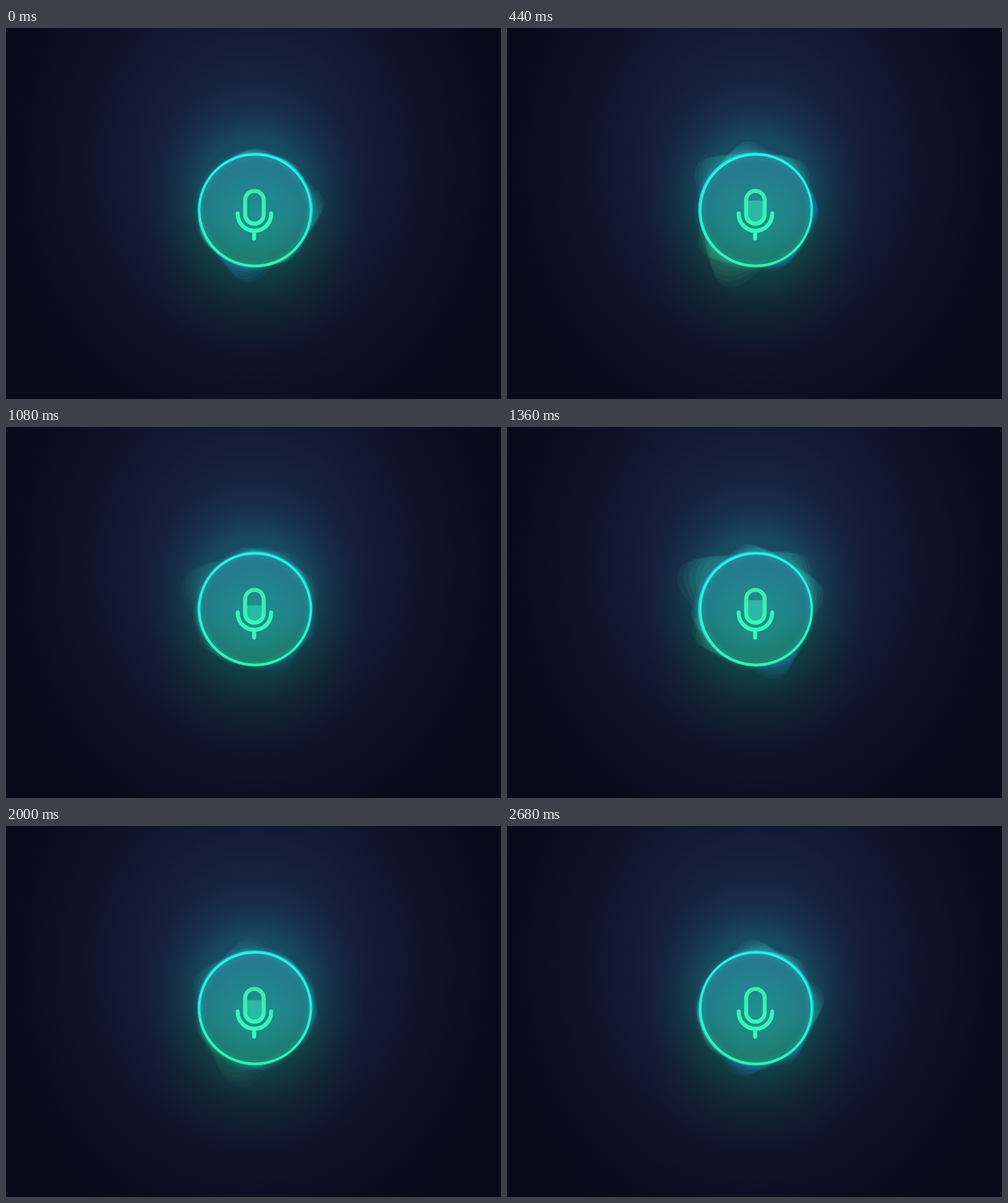
Write an HTML page with a canvas that moves like this. It is 800x600 px and loops after 2.72 s.

```html
<!DOCTYPE html>
<html lang="en">
<head>
<meta charset="utf-8">
<title>Voice button</title>
<style>
html, body { margin: 0; width: 100%; height: 100%; overflow: hidden; background: #070a19; }
canvas { display: block; width: 800px; height: 600px; }
</style>
</head>
<body>
<canvas id="stage" width="800" height="600"></canvas>
<script>
const LOOP = 2720, STEP = 40, TAU = Math.PI * 2;
const CX = 402.5, CY = 294.5, R = 90;
const BOX = { x: 200, y: 150, w: 400, h: 330 };
const ctx = document.getElementById('stage').getContext('2d');

// Wisp tints: teal, blue, green
const TINTS = ['40,200,165', '15,125,230', '45,180,100'];

// Each pose: time, then wisps as [angle, height, tint]
const POSES = [
  [0, [[-3, 21, 0], [101, 27, 1], [-92, 9, 2], [-52, 6, 0], [150, 6, 2], [55, 7, 2]]],
  [440, [[-137, 29, 0], [-102, 21, 0], [-48, 17, 0], [0, 11, 1], [117, 42, 2], [138, 20, 2], [62, 12, 1]]],
  [800, [[-88, 16, 0], [-45, 9, 0], [17, 20, 1], [171, 7, 0], [125, 10, 2]]],
  [1360, [[-149, 49, 0], [-95, 15, 0], [-50, 25, 0], [-20, 22, 0], [150, 20, 2], [172, 14, 0], [68, 26, 1]]],
  [1720, [[-105, 8, 2], [-50, 9, 0], [-5, 16, 2], [94, 18, 1], [148, 14, 2], [28, 6, 1]]],
  [2280, [[-92, 33, 0], [-143, 24, 0], [-55, 14, 0], [-15, 15, 0], [18, 22, 1], [113, 54, 2], [145, 16, 2], [85, 17, 1]]],
  [2680, [[-89, 20, 0], [-50, 14, 0], [-5, 20, 0], [100, 21, 1], [52, 14, 1], [172, 6, 0], [145, 9, 2]]]
];

// Microphone fill: time, top edge
const LEVELS = [[0, 314], [440, 279], [800, 297], [1360, 280], [1720, 295], [2040, 281], [2280, 290], [2640, 314], [2720, 314]];

const ease = x => (1 - Math.cos(Math.PI * x)) / 2;

function layer(w, h) {
  const canvas = document.createElement('canvas');
  canvas.width = w;
  canvas.height = h;
  return canvas.getContext('2d');
}

function gradient(g, stops) {
  stops.forEach(([at, color]) => g.addColorStop(at, color));
  return g;
}
const radial = (x, y, r, stops) => gradient(ctx.createRadialGradient(x, y, 0, x, y, r), stops);
const vertical = (y0, y1, stops) => gradient(ctx.createLinearGradient(0, y0, 0, y1), stops);

function circle(c, x, y, r) {
  c.beginPath();
  c.arc(x, y, r, 0, TAU);
}

const micPaint = vertical(260, 344, [[0, '#3cecaa'], [1, '#30ffc2']]);

function makeBackground() {
  const c = layer(800, 600);
  c.save();
  c.translate(400, 220);
  c.scale(420, 480);
  c.fillStyle = radial(0, 0, 1, [[0, '#1a3050'], [.25, '#182643'], [.46, '#131b37'], [.7, '#0e1228'], [1, '#070a19']]);
  c.fillRect(-1, -1, 2, 2);
  c.restore();
  const blueGlow = radial(402, 265, 180, [
    [0, 'rgba(25,110,140,.7)'], [.5, 'rgba(25,105,138,.48)'], [.72, 'rgba(22,80,115,.2)'], [1, 'rgba(20,60,100,0)']]);
  const greenGlow = radial(402, 335, 190, [
    [0, 'rgba(14,95,70,.7)'], [.4, 'rgba(14,85,60,.42)'], [.7, 'rgba(16,65,50,.2)'], [1, 'rgba(16,50,45,0)']]);
  for (const paint of [blueGlow, greenGlow]) {
    c.fillStyle = paint;
    c.fillRect(0, 0, 800, 600);
  }
  return c.canvas;
}

function makeDisc() {
  const c = layer(800, 600);
  circle(c, CX, CY, R);
  c.fillStyle = vertical(204, 386, [[0, '#267b91'], [.5, '#217d88'], [1, '#1d7866']]);
  c.fill();
  c.fillStyle = radial(402, 308, 80, [[0, 'rgba(30,165,150,.5)'], [1, 'rgba(30,165,150,0)']]);
  c.fill();
  return c.canvas;
}

function makeRing() {
  const c = layer(800, 600);
  circle(c, CX, CY, R);
  c.shadowColor = 'rgba(30,215,200,.65)';
  c.shadowBlur = 10;
  c.strokeStyle = vertical(204, 386, [[0, '#22f6e8'], [.5, '#20f5d6'], [1, '#2affa2']]);
  c.lineWidth = 3.4;
  c.stroke();
  return c.canvas;
}

const background = makeBackground(), disc = makeDisc(), ring = makeRing();

// Half-size layer: scaling it up softens the wisps.
const mist = layer(BOX.w / 2, BOX.h / 2);

function stamp(image) {
  const { x, y, w, h } = BOX;
  ctx.drawImage(image, x, y, w, h, x, y, w, h);
}

// A pose is strongest at its own time and gone at its neighbours' times.
function presence(i, t) {
  const at = POSES[i][0];
  const prev = i ? POSES[i - 1][0] : -STEP;
  const next = i < POSES.length - 1 ? POSES[i + 1][0] : LOOP;
  if (t <= prev || t >= next) return 0;
  return ease(t < at ? (t - prev) / (at - prev) : (next - t) / (next - at));
}

function drawWisp([angle, height, tint], power, drift) {
  const span = 24 + height * .25;
  const gain = power * (.7 + 4 / height);
  mist.fillStyle = `rgba(${TINTS[tint]},${.085 * gain})`;
  mist.strokeStyle = `rgba(${TINTS[tint]},${.13 * gain})`;
  for (let k = 0; k < 5; k++) {
    const h = height * (1 - k * .16) * (.45 + .55 * power);
    const mid = angle + drift + (k - 1) * 4 * (angle % 2 ? 1 : -1);
    mist.beginPath();
    for (let s = -12; s <= 12; s++) {
      const u = 1 - Math.abs(s / 12);
      const r = R + h * u * u * (3 - 2 * u);
      const a = (mid + span * s / 12) * TAU / 360;
      mist.lineTo(CX + r * Math.cos(a), CY + r * Math.sin(a));
    }
    mist.fill();
    mist.stroke();
  }
}

function drawWisps(t) {
  mist.setTransform(1, 0, 0, 1, 0, 0);
  mist.clearRect(0, 0, BOX.w, BOX.h);
  mist.setTransform(.5, 0, 0, .5, -BOX.x / 2, -BOX.y / 2);
  mist.lineWidth = 1.4;
  POSES.forEach(([at, wisps], i) => {
    const power = presence(i, t);
    if (power) wisps.forEach(w => drawWisp(w, power, (t - at) * .02));
  });
  ctx.globalCompositeOperation = 'screen';
  ctx.drawImage(mist.canvas, BOX.x, BOX.y, BOX.w, BOX.h);
  ctx.globalCompositeOperation = 'source-over';
}

function halo(dx, dy, color, width) {
  circle(ctx, CX + dx, CY + dy, R + 1);
  ctx.strokeStyle = color;
  ctx.lineWidth = width;
  ctx.stroke();
}

function drawButton(t) {
  const turn = t / LOOP * TAU;
  stamp(disc);
  ctx.globalCompositeOperation = 'screen';
  halo(1.1 * Math.cos(turn * 3), -.8, 'rgba(10,130,255,.7)', 3);
  halo(-1, .8 * Math.cos(turn * 2), 'rgba(15,150,255,.55)', 2.5);
  halo(.4 * Math.sin(turn * 5), .9, 'rgba(110,255,30,.4)', 2);
  ctx.globalCompositeOperation = 'source-over';
  stamp(ring);
}

function levelAt(t) {
  const i = LEVELS.findIndex(([at]) => at > t);
  const [t0, y0] = LEVELS[i - 1], [t1, y1] = LEVELS[i];
  return y0 + (y1 - y0) * ease((t - t0) / (t1 - t0));
}

function capsule() {
  ctx.beginPath();
  ctx.roundRect(386.5, 263.5, 30, 53, 15);
}

function drawMic(t) {
  const top = levelAt(t);
  if (top < 314) {
    ctx.save();
    capsule();
    ctx.clip();
    ctx.fillStyle = 'rgba(55,220,185,.55)';
    ctx.fillRect(386, top, 31, 317 - top);
    ctx.restore();
  }
  ctx.strokeStyle = micPaint;
  ctx.lineWidth = 6.5;
  ctx.lineCap = 'round';
  capsule();
  ctx.moveTo(374.5, 300);
  ctx.arc(401.5, 301, 27, Math.PI, 0, true);
  ctx.lineTo(428.5, 300);
  ctx.moveTo(401, 330);
  ctx.lineTo(401, 340.5);
  ctx.stroke();
}

function draw(t) {
  stamp(background);
  drawWisps(t);
  drawButton(t);
  drawMic(t);
}

const start = performance.now();
let shown = -1;
function tick() {
  const t = Math.floor((performance.now() - start) % LOOP / STEP) * STEP;
  if (t !== shown) draw(shown = t);
  requestAnimationFrame(tick);
}
ctx.drawImage(background, 0, 0);
tick();
</script>
</body>
</html>
```
